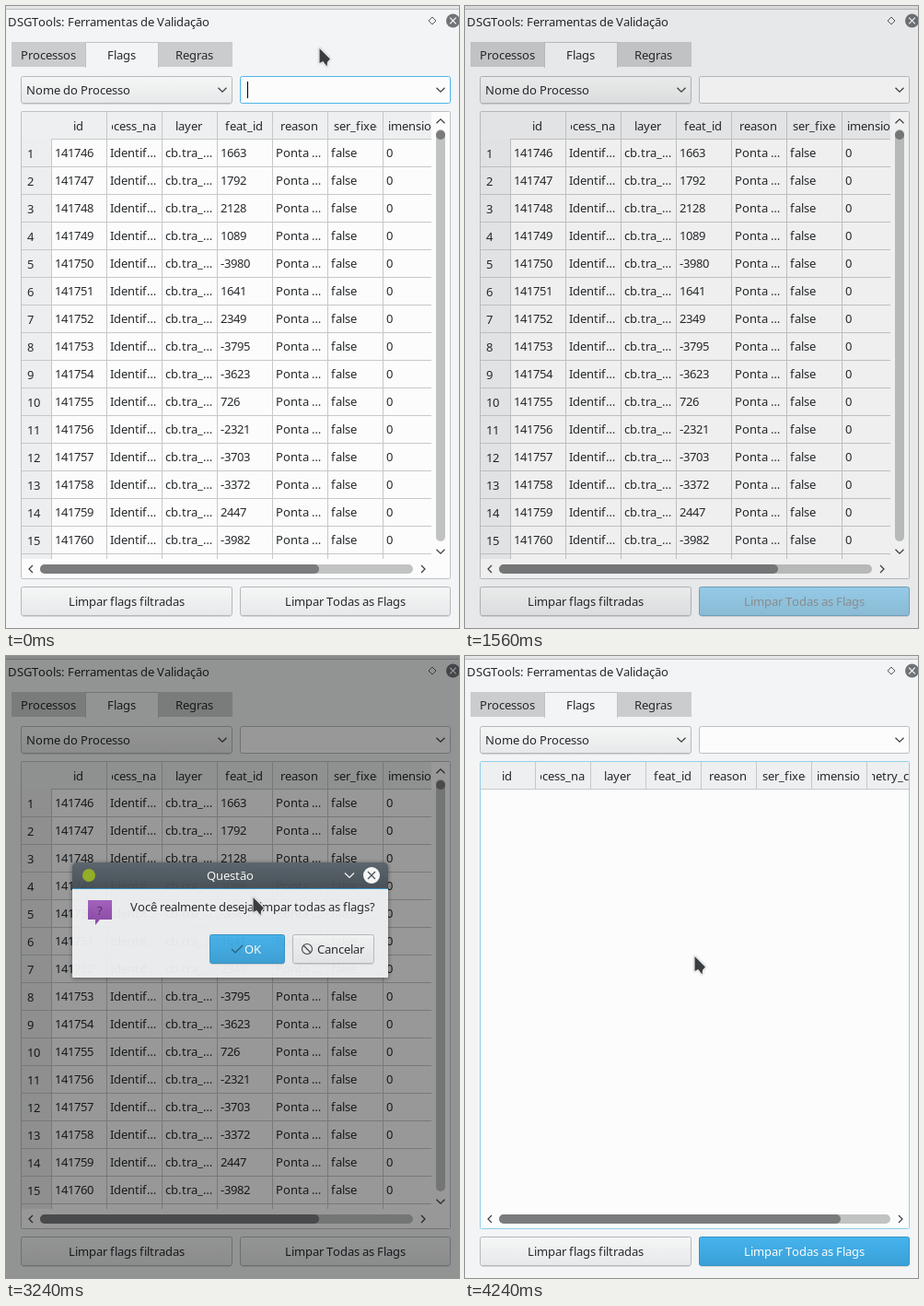
An HTML page with a canvas for the animation above (5.68 s loop, 492 px wide and 675 px high).

```html
<!DOCTYPE html>
<html lang="pt">
<head>
<meta charset="utf-8">
<title>Ferramentas de Validação</title>
<style>
html, body { margin: 0; width: 100%; height: 100%; overflow: hidden; background: #f3f4f5; }
canvas { display: block; width: 492px; height: 675px; }
</style>
</head>
<body>
<canvas id="stage"></canvas>
<script>
const W = 492, H = 675, LOOP = 5680, STEP = 40;
const FONT = '13px "Noto Sans", sans-serif';
const INK = '#26292c', BG = '#f3f4f5', VIEW = '#fcfcfc', LINE = '#c6c8c9', EDGE = '#b6b8ba';
const HOVER = '#93cee9', ICON = '#3b3f42', GROOVE = '#c1c2c2', HANDLE = '#797b7c';

const dpr = window.devicePixelRatio || 1;
function layer(canvas) {
  canvas.width = W * dpr;
  canvas.height = H * dpr;
  const c = canvas.getContext('2d');
  c.scale(dpr, dpr);
  c.font = FONT;
  return c;
}
const stage = layer(document.getElementById('stage'));
const overlay = layer(document.createElement('canvas'));
let g = stage;

// Timing
const ramp = (t, a, b) => Math.min(1, Math.max(0, (t - a) / (b - a)));
const pulse = (t, a, b, c, d) => ramp(t, a, b) - ramp(t, c, d);

const dim = t => .4 * pulse(t, 1520, 1840, 3840, 4000);
const dialogAlpha = t => 1 - .13 * pulse(t, 2800, 2960, 3120, 3320) - ramp(t, 3520, 3680);
const buttonGlow = t => pulse(t, 1160, 1320, 1480, 1640) + ramp(t, 3780, 4000);
const labelGlow = t => pulse(t, 1240, 1280, 1480, 1640) + ramp(t, 3800, 3940);

// Pointer legs: start, end, x, y
const legs = [
  [320, 935, 314, 645], [1400, 1560, -92, 560], [1560, 2800, -158, 227], [2800, 3160, 262, 239],
  [3160, 3240, 268, 261], [3240, 3360, 262, 317], [3880, 4240, 249, 325]
];
function pointer(t) {
  let x = 340, y = 45;
  for (const [a, b, toX, toY] of legs) {
    const k = ramp(t, a, b);
    x += (toX - x) * k;
    y += (toY - y) * k;
    if (k < 1) break;
  }
  return [Math.round(x), Math.round(y)];
}

// Drawing helpers
const rgb = hex => [1, 3, 5].map(i => parseInt(hex.slice(i, i + 2), 16));
function mix(a, b, k) {
  const q = rgb(b);
  return `rgb(${rgb(a).map((v, i) => Math.round(v + (q[i] - v) * k))})`;
}

function rect(x, y, w, h, color) {
  g.fillStyle = color;
  g.fillRect(x, y, w, h);
}

function pill(x, y, w, h, r, color) {
  g.beginPath();
  g.roundRect(x, y, w, h, r);
  g.fillStyle = color;
  g.fill();
}

function box(x, y, w, h, fill, border, r = 2) {
  pill(x + .5, y + .5, w - 1, h - 1, r, fill);
  g.strokeStyle = border;
  g.lineWidth = 1;
  g.stroke();
}

function fade(y, h, top, bottom) {
  const f = g.createLinearGradient(0, y, 0, y + h);
  f.addColorStop(0, top);
  f.addColorStop(1, bottom);
  return f;
}

// Whole-pixel glyph advances, as in hinted desktop text
const advances = new Map();
function advance(ch) {
  if (!advances.has(ch)) advances.set(ch, Math.floor(g.measureText(ch).width + .53));
  return advances.get(ch);
}

function text(s, x, y, color = INK) {
  g.fillStyle = color;
  for (const ch of String(s)) {
    g.fillText(ch, x, y);
    x += advance(ch);
  }
}

function centered(s, x, y, color) {
  const width = [...s].reduce((sum, ch) => sum + advance(ch), 0);
  text(s, Math.floor(x - width / 2), y, color);
}

function trace(points, closed) {
  g.beginPath();
  points.forEach(p => g.lineTo(...p));
  if (closed) g.closePath();
}

function poly(points, color, width = 1.2, closed = false) {
  trace(points, closed);
  g.strokeStyle = color;
  g.lineWidth = width;
  g.stroke();
}

function disc(x, y, r, color) {
  pill(x - r, y - r, 2 * r, 2 * r, r, color);
}

function clip(x, y, w, h, draw) {
  g.save();
  g.beginPath();
  g.rect(x, y, w, h);
  g.clip();
  draw();
  g.restore();
}

// Chevron pointing along (dx, dy)
function chevron(x, y, dx, dy, size = 4.5, color = ICON) {
  const s = size / 2;
  poly([[x - dx * s + dy * size, y - dy * s + dx * size], [x + dx * s, y + dy * s],
        [x - dx * s - dy * size, y - dy * s - dx * size]], color);
}

function cross(x, y, r, color) {
  poly([[x - r, y - r], [x + r, y + r]], color);
  poly([[x - r, y + r], [x + r, y - r]], color);
}

function plate(x, y, w, h, k = 0, edge = EDGE) {
  rect(x + 2, y + h, w - 4, 1, 'rgba(0,0,0,.12)');
  box(x, y, w, h, fade(y, h, mix('#f5f6f6', '#45b4ee', k), mix('#e7e8e9', '#3a9fd6', k)), mix(edge, '#3594c7', k));
}

// Panel
function drawTop(t) {
  rect(0, 0, W, H, BG);
  rect(0, 0, W, 3, '#e3e5e6');
  rect(0, 3, W, 1, '#bcbfc1');
  text('DSGTools: Ferramentas de Validação', 2, 22);
  poly([[463, 12], [467, 16], [463, 20], [459, 16]], '#5b5f62', 1, true);
  disc(485.5, 16, 7.5, '#707478');
  cross(485.5, 16, 3.3, VIEW);

  rect(6, 39, 240, 27, '#cbcccd');
  rect(86, 39, 80, 28, '#c0c2c3');
  rect(87, 40, 78, 28, BG);
  ['Processos', 'Flags', 'Regras'].forEach((name, i) => centered(name, 46 + i * 79.7, 58));

  plate(16, 76, 230, 30);
  text('Nome do Processo', 22, 96);
  chevron(235, 91, 0, 1);
  box(254, 76, 229, 30, VIEW, mix('#4db5ea', '#bcbebf', ramp(t, 1280, 1480)));
  chevron(472, 91, 0, 1);
  if (t < 200 || (t >= 720 && t < 1200)) rect(262, 82, 1, 18, '#000000');
}

const heads = ['id', 'process_name', 'layer', 'feat_id', 'reason', 'user_fixed', 'dimension', 'geometry_column'];
const feats = [1663, 1792, 2128, 1089, -3980, 1641, 2349, -3795, -3623, 726, -2321, -3703, -3372, 2447, -3982];

function drawHeads(left, right) {
  rect(17, 115, right - 17, 29, '#eeeff0');
  rect(left, 144, right - left, 1, LINE);
  clip(17, 115, right - 17, 30, () => heads.forEach((name, i) => {
    const x = left + i * 60;
    if (i) rect(x, 115, 1, 30, LINE);
    clip(x + 6, 115, 48, 29, () => centered(name, x + 30, 135));
  }));
}

function drawRows() {
  clip(17, 115, 445, 485, () => {
    rect(17, 144, 32, 456, '#edeeef');
    feats.forEach((feat, i) => {
      const y = 145 + i * 30;
      rect(17, y + 29, 445, 1, LINE);
      text(i + 1, 23, y + 20);
      [141746 + i, 'Identif…', 'cb.tra_…', feat, 'Ponta …', 'false', 0]
        .forEach((value, c) => text(value, 53 + c * 60, y + 19));
    });
    for (let x = 49; x < 462; x += 60) rect(x, 145, 1, 455, LINE);
  });
}

function drawTable(empty, hover) {
  box(16, 114, 467, 508, VIEW, hover ? HOVER : '#bfc1c2', 1);
  drawHeads(empty ? 16 : 49, empty ? 482 : 462);
  const right = empty ? 462 : 442;
  if (!empty) {
    drawRows();
    pill(467, 134, 10, 447, 5, GROOVE);
    disc(472, 140, 5, HANDLE);
    chevron(472, 125, 0, -1);
    chevron(472, 592, 0, 1);
  }
  pill(37, 606, right - 37, 10, 5, GROOVE);
  pill(37, 606, empty ? 371 : 303, 10, 5, HANDLE);
  chevron(27, 611, -1, 0, 4);
  chevron(right + 11, 611, 1, 0, 4);
}

function drawButtons(t, [x, y]) {
  plate(16, 630, 230, 32);
  centered('Limpar flags filtradas', 131, 651);
  const shift = t >= 1200 && t < 1360 ? 1 : 0;
  const over = t < 1500 && x > 254 && y >= 630;
  plate(254 + shift, 630 + shift, 229, 32, buttonGlow(t), over ? HOVER : EDGE);
  centered('Limpar Todas as Flags', 368.5 + shift, 651 + shift, mix(INK, VIEW, labelGlow(t)));
}

// Question dialog
function drawDialog(x, y, pressed) {
  g.save();
  g.translate(x, y);
  g.save();
  g.shadowColor = 'rgba(0,0,0,.45)';
  g.shadowBlur = 5 * dpr;
  g.shadowOffsetY = dpr;
  pill(0, 0, 343, 125, [4, 4, 1, 1], '#eff0f1');
  g.restore();
  pill(0, 0, 343, 28, [4, 4, 0, 0], fade(0, 28, '#59646c', '#454e55'));
  rect(0, 28, 343, 1, '#3a93c0');
  disc(18, 14, 7, '#93b023');
  centered('Questão', 171.5, 19, VIEW);
  chevron(301, 14, 0, 1, 5, VIEW);
  disc(325, 14, 9, VIEW);
  cross(325, 14, 4, '#475057');

  trace([[17, 41], [43, 41], [43, 62], [30, 62], [25, 68], [25, 62], [17, 62]]);
  g.fillStyle = fade(41, 27, '#a45fbf', '#8746a3');
  g.fill();
  centered('?', 30, 57, '#4f2a60');
  text('Você realmente deseja limpar todas as flags?', 63, 53);

  const d = pressed ? 1 : 0;
  plate(149 + d, 78 + d, 82, 32, 1);
  poly([[173 + d, 94 + d], [177 + d, 98 + d], [185 + d, 90 + d]], '#285c77');
  text('OK', 187 + d, 99 + d, VIEW);
  plate(239, 78, 89, 32);
  g.beginPath();
  g.arc(255, 94, 5.5, 0, 7);
  g.strokeStyle = ICON;
  g.lineWidth = 1.1;
  g.stroke();
  poly([[251, 90], [259, 98]], ICON, 1.1);
  text('Cancelar', 266, 99);
  g.restore();
}

function drawPointer([x, y]) {
  g.save();
  g.translate(x + .5, y + 1);
  trace([[0, 0], [0, 16], [3.8, 14], [8, 19.5], [8.6, 14.8], [11.5, 11.5]], true);
  g.lineJoin = 'round';
  g.strokeStyle = '#f4f4f4';
  g.lineWidth = 1.8;
  g.shadowColor = 'rgba(0,0,0,.3)';
  g.shadowBlur = 2 * dpr;
  g.stroke();
  g.shadowColor = 'transparent';
  g.fillStyle = '#3a3e41';
  g.fill();
  g.restore();
}

function draw(t) {
  const mouse = pointer(t);
  const overTable = mouse[0] >= 16 && mouse[1] >= 114 && mouse[1] < 622;
  const empty = t >= 3680;
  g = stage;
  drawTop(t);
  drawTable(empty, overTable && (t < 1500 || empty));
  drawButtons(t, mouse);
  rect(0, 0, W, H, `rgba(0,0,0,${dim(t)})`);

  if (t > 2800 && t < 3680) {
    // The dialog hangs on the pointer until it is dropped
    const [x, y] = pointer(Math.min(t, 3160));
    g = overlay;
    g.clearRect(0, 0, W, H);
    drawDialog(x - 190, y - 15, t >= 3440 && t < 3520);
    g = stage;
    g.globalAlpha = dialogAlpha(t);
    g.drawImage(overlay.canvas, 0, 0, W, H);
    g.globalAlpha = 1;
  }
  drawPointer(mouse);
}

const start = performance.now();
function tick() {
  const t = (performance.now() - start) % LOOP;
  draw(Math.floor(t / STEP) * STEP);
  requestAnimationFrame(tick);
}
tick();
</script>
</body>
</html>
```
